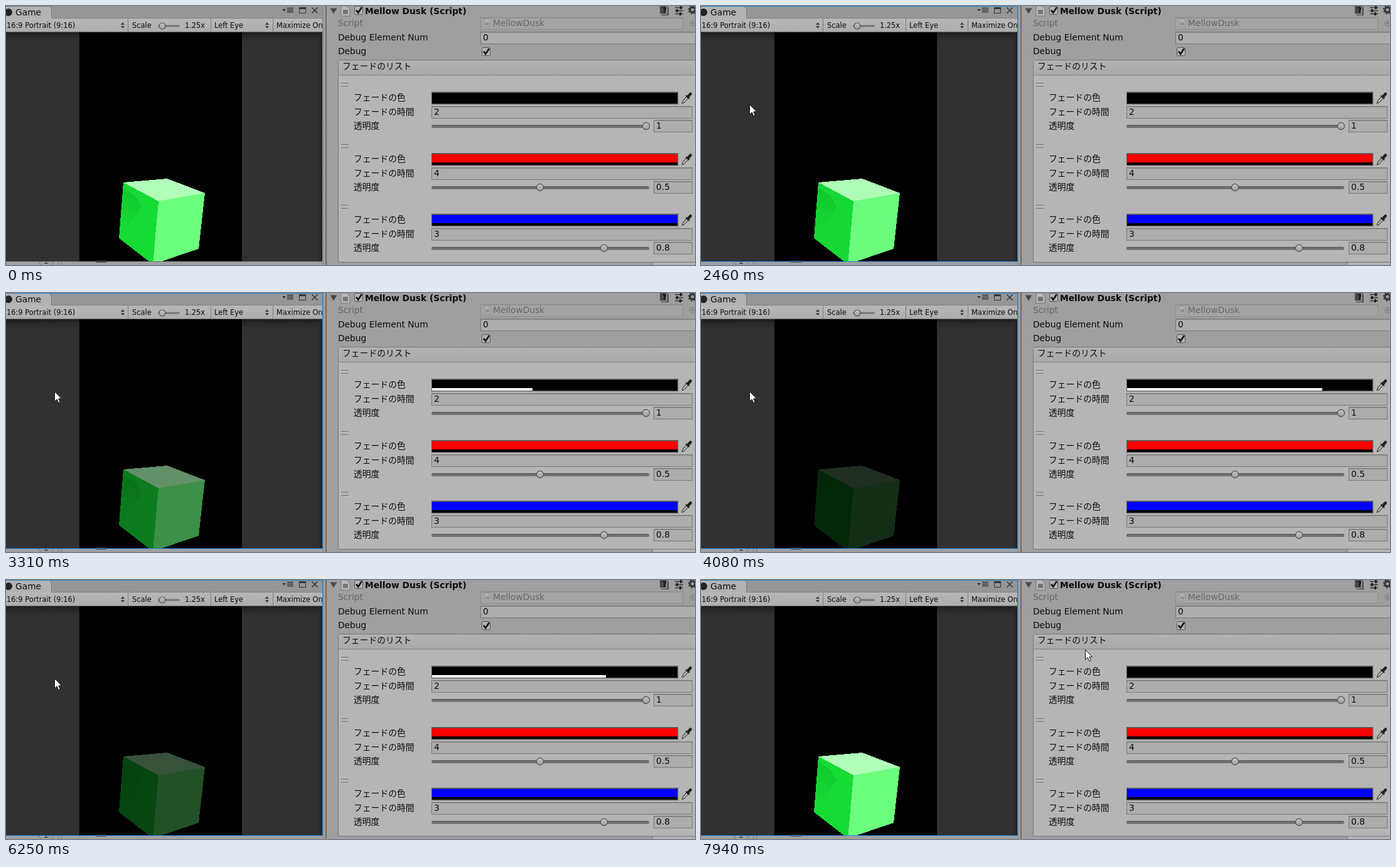
Recreate the animation shown at these times as an HTML page. Size 1098 by 414 pixels, loop 8000 ms.

```html
<!DOCTYPE html>
<html lang="ja">
<head>
<meta charset="utf-8">
<title>Fade inspector</title>
<style>
html, body { margin: 0; width: 100%; height: 100%; overflow: hidden; background: #9f9f9f; }
svg { display: block; width: 1098px; height: 414px; }
text { font: 13.8px "DejaVu Sans", "Noto Sans CJK JP", "Noto Sans CJK", sans-serif; fill: #0c0c0c; white-space: pre; }
.small { font-size: 11.4px; }
.bold { font-weight: bold; }
.dim { fill: #666; }
.cube { shape-rendering: crispEdges; }
</style>
</head>
<body>
<svg id="stage" viewBox="0 0 1098 414" xmlns="http://www.w3.org/2000/svg"></svg>
<script>
const rect = (x, y, w, h, fill, extra = '') =>
  `<rect x="${x}" y="${y}" width="${w}" height="${h}" fill="${fill}" ${extra}/>`;
const text = (x, y, s, cls = '') => `<text x="${x}" y="${y}" class="${cls}">${s}</text>`;
const path = (d, fill, extra = '') => `<path d="${d}" fill="${fill}" ${extra}/>`;
const line = (d, color, width = 1) => path(d, 'none', `stroke="${color}" stroke-width="${width}"`);
const circle = (x, y, r, fill, extra = '') => `<circle cx="${x}" cy="${y}" r="${r}" fill="${fill}" ${extra}/>`;

const field = (x, y, w, h, fill = '#adadad', edge = '#777') =>
  rect(x + .5, y + .5, w - 1, h - 1, fill, `stroke="${edge}"`) +
  rect(x + 1, y + 1, w - 2, 1, '#929292');

const checkbox = (x, y) =>
  rect(x + .5, y + .5, 13, 13, '#b4b4b4', 'rx="2" stroke="#555"') +
  line(`M${x + 3} ${y + 6.5}l3.2 4.3L${x + 12} ${y + 2}`, '#111', 2.6);

const knob = (x, y, r) => circle(x, y, r, 'url(#knob)', 'stroke="#4b4b4b" stroke-width="1.1"');

const popup = (x, y) => path(`M${x - 3} ${y - 1}l3 -4l3 4zM${x - 3} ${y + 1}l3 4l3 -4z`, '#3c3c3c');

const dropper = (x, y) => `<g transform="translate(${x} ${y}) rotate(42)">` +
  path('M-1.700 -1V8L0 11.500L1.700 8V-1z', '#c4c4c4', 'stroke="#333"') +
  rect(-4, -3, 8, 2.2, '#222', 'rx="1"') +
  rect(-2.3, -11, 4.6, 9, '#222', 'rx="2.2"') + '</g>';

function gamePane() {
  return rect(0, 0, 506, 414, '#9f9f9f') +
    rect(0, 0, 504, 20, '#969696') +
    path('M0 1H69L72 4V20H0z', '#b3b3b3') + line('M0 .5H69L72.5 4V20', '#7b7b7b') +
    circle(4, 10, 6, '#222') + text(15, 15, 'Game') +
    path('M440 5h6l-3 3.5z', '#333') + line('M448 3.5h10M448 6.5h10M448 9.5h10', '#333', 1.5) +
    rect(467.5, 2.5, 10, 9, 'none', 'stroke="#333"') + rect(467, 2, 11, 3, '#333') +
    line('M487.5 2.5l9 9m0 -9l-9 9', '#333', 1.5) +
    rect(0, 20, 504, 21, 'url(#bar)') + line('M72 19.5H504', '#828282') + line('M0 41.5H504', '#666') +
    line('M194.5 20V41M326.5 20V41M425.5 20V41', '#7e7e7e') +
    text(1, 35, '16:9 Portrait (9:16)', 'small') + popup(186, 31) +
    text(201, 35, 'Scale', 'small') + rect(242, 30.5, 35, 3, '#777', 'rx="1.5"') + knob(249, 32, 5) +
    text(285, 35, '1.25x', 'small') + text(332, 35, 'Left Eye', 'small') + popup(416, 31) +
    `<g clip-path="url(#toolbar)">${text(431, 35, 'Maximize On', 'small')}</g>` +
    rect(0, 42, 504, 366, '#313131') +
    rect(0, 42, 504, 20, 'url(#topShadow)') + rect(495, 42, 9, 366, 'url(#sideShadow)') +
    rect(117, 42, 259, 366, '#000') +
    '<g class="cube" clip-path="url(#view)">' +
    path('M187 282L257 276L317 299L243 312z', '#b1ffb9') +
    path('M187 282L243 312L234 413L180 371z', '#16db35') +
    path('M187 290L207 304L216 321L192 354L181 368z', 'url(#shade)') +
    path('M243 312L317 299L307 388L234 413z', '#6cff7e') + '</g>' +
    rect(117, 42, 259, 366, '#000', 'id="veil" opacity="0"');
}

function strip() {
  return rect(0, 408, 506, 6, '#a0a0a0') + line('M0 408.5H504', '#777') +
    line('M52 408A12.5 12.5 0 0 0 76 408', '#6e6e6e') + line('M61 411.5h6M64 408v4', '#333') +
    line('M83.5 408V414M88.5 409V414', '#777') + rect(143, 407, 17, 3, '#444', 'rx="1.5"');
}

function fadeRow(dy, color, time, alpha, knobX, id = '') {
  const y = n => Math.round(n + dy);
  return line(`M534 ${y(123) + .5}h12M534 ${y(128) + .5}h12`, '#6d6d6d') +
    line(`M534 ${y(124) + .5}h12M534 ${y(129) + .5}h12`, '#c4c4c4') +
    text(554, y(151), 'フェードの色') + text(554, y(174), 'フェードの時間') + text(554, y(196), '透明度') +
    rect(678, y(137), 394, 21, '#9a9a9a') + rect(678, y(137), 393, 20, '#5b5b5b') +
    rect(679, y(139), 391, 17, color) + rect(679, y(152), 391, 4, '#000') +
    (id && rect(679, y(152), 0, 4, '#fff', `id="${id}"`)) + dropper(1085, y(147)) +
    field(678, y(160), 416, 20) + text(682, y(174), time) +
    rect(678, y(190), 347, 5, '#727272', 'rx="2.5"') + rect(679, y(190), 345, 1.5, '#5d5d5d', 'rx="1"') +
    knob(knobX, y(192.4), 5.6) +
    field(1032, y(182), 62, 20) + text(1036, y(196), alpha);
}

function inspector() {
  return rect(506, 0, 592, 414, '#9f9f9f') + rect(504, 0, 2, 414, '#8c8c8c') + rect(509, 0, 2, 414, '#6c6c6c') +
    path('M516.5 3.5h11l-5.5 9z', '#484848') +
    path('M534 0h9l5 5v11h-14z', '#b9b9b9', 'stroke="#777"') + rect(537, 6, 8, 7, '#777') +
    checkbox(555, 0) + text(572, 12.5, 'Mellow Dusk (Script)', 'bold') +
    path('M1042 0h11l3 2v13h-11l-3 -2z', '#4a4a4a') + text(1046, 11, '?', 'small bold') +
    line('M1042 13h11V1', '#ccc') +
    line('M1066 2.5h13M1066 7.5h13M1066 12.5h13', '#333', 1.5) +
    line('M1075.5 0v5M1069.5 5v5M1074.5 10v5', '#222', 3) +
    circle(1094, 6, 4, 'none', 'stroke="#333" stroke-width="3"') +
    circle(1094, 6, 6.2, 'none', 'stroke="#333" stroke-width="2" stroke-dasharray="2.4 2.4"') +
    text(529, 32, 'Script', 'dim') + field(756, 18, 323, 20, '#a4a4a4', '#8d8d8d') +
    path('M762 20.500h6l4 4v9h-10z', '#b0b0b0', 'stroke="#929292"') + rect(764, 26, 6, 5, '#929292') +
    text(776, 32, 'MellowDusk', 'dim') +
    circle(1094, 27.5, 4.5, 'none', 'stroke="#777"') + circle(1094, 27.5, 1.7, '#777') +
    text(529, 55, 'Debug Element Num') + field(756, 41, 346, 20) + text(760, 55, '0') +
    text(529, 77, 'Debug') + checkbox(758, 66) +
    path('M529.5 409.500V90Q529.500 86.500 533 86.500H1100V409.500z', '#b5b5b5', 'stroke="#777"') +
    path('M530 110V90Q530 87 533 87H1098V110z', 'url(#head)') + line('M530 110.500H1098', '#858585') +
    text(536, 101, 'フェードのリスト') +
    fadeRow(0, '#000', '2', '1', 1020, 'progress') +
    fadeRow(97.8, '#f00', '4', '0.5', 851) +
    fadeRow(195, '#00f', '3', '0.8', 953) +
    rect(1031, 410, 67, 4, '#b5b5b5') + line('M1030.500 410V414', '#777');
}

const grad = (id, a, b, dir = 'x2="0" y2="1"', endOpacity = 1) =>
  `<linearGradient id="${id}" ${dir}><stop stop-color="${a}"/>` +
  `<stop offset="1" stop-color="${b}" stop-opacity="${endOpacity}"/></linearGradient>`;

document.getElementById('stage').innerHTML = '<defs>' +
  grad('bar', '#b7b7b7', '#adadad') + grad('head', '#b2b2b2', '#a9a9a9') + grad('knob', '#c6c6c6', '#9c9c9c') +
  grad('topShadow', '#1e1e1e', '#313131', 'x2="0" y2="1"', 0) +
  grad('sideShadow', '#1e1e1e', '#313131', 'x1="1" x2="0"', 0) +
  grad('shade', '#11cb2e', '#16db35', 'x1=".6" y1=".2" x2=".4" y2=".9"') +
  '<clipPath id="view"><rect x="117" y="42" width="259" height="366"/></clipPath>' +
  '<clipPath id="toolbar"><rect x="426" y="20" width="78" height="21"/></clipPath></defs>' +
  gamePane() + strip() + inspector() +
  `<g id="focus">${line('M0 .5H504.5V408.5H0', '#1883dc')}</g>` +
  path('M.5 .5V16.300L4.200 12.900L6.700 18.700L9.200 17.600L6.700 11.900H11.600z', '#fff',
    'id="cursor" stroke="#111" stroke-width="1"');

const [veil, progress, focusRing, cursor] =
  ['veil', 'progress', 'focus', 'cursor'].map(id => document.getElementById(id));

const LOOP = 8000;
const VEIL_LEAD = 50; // the bar is redrawn slightly later than the game view

// Moments at which the screen refreshes.
const ticks = [0, ...Array.from({ length: 11 }, (_, i) => 210 + i * 100), 1380, 1450,
  2460, 2620, 2740, 2880, 3020, 3160, 3310, 3460, 3620, 3770, 3920, 4080, 4230, 4390, 4540,
  5620, 5790, 5910, 6030, 6150, 6270, 6390, 6510, 6630,
  6790, 6940, 7020, 7160, 7300, 7430, 7570, 7710, 7870, 7940];

const fadeKeys = [[0, 0], [2490, 0], [4490, 1], [5538, 1], [5620, .959], [6630, .48], [6940, .319], [7590, 0], [LOOP, 0]];
const mix = (a, b, k) => a + (b - a) * k;

function fadeAt(t) {
  const i = fadeKeys.findIndex(k => k[0] > t);
  const [t0, a] = fadeKeys[i - 1], [t1, b] = fadeKeys[i];
  return mix(a, b, (t - t0) / (t1 - t0));
}

function cursorAt(t) {
  if (t >= 7940) return [612, 111];
  if (t >= 7870) return [210, 150];
  if (t >= 1210) return [77, 157];
  if (t >= 1010) {
    const k = (t - 1010) / 200;
    return [mix(62, 77, k), mix(142, 157, k)];
  }
  const k = 1 - (1 - (t - 210) / 800) ** 2;
  return [mix(643, 62, k), mix(313, 142, k)];
}

function draw(time) {
  const t = ticks.findLast(tick => tick <= time);
  veil.setAttribute('opacity', fadeAt(t + VEIL_LEAD));
  progress.setAttribute('width', Math.round(391 * fadeAt(t)));
  focusRing.style.display = t >= 1380 ? '' : 'none';
  cursor.style.display = t >= 210 ? '' : 'none';
  cursor.setAttribute('transform', `translate(${cursorAt(t).map(Math.round)})`);
}

const start = performance.now();
function loop() {
  draw((performance.now() - start) % LOOP);
  requestAnimationFrame(loop);
}
loop();
</script>
</body>
</html>
```
